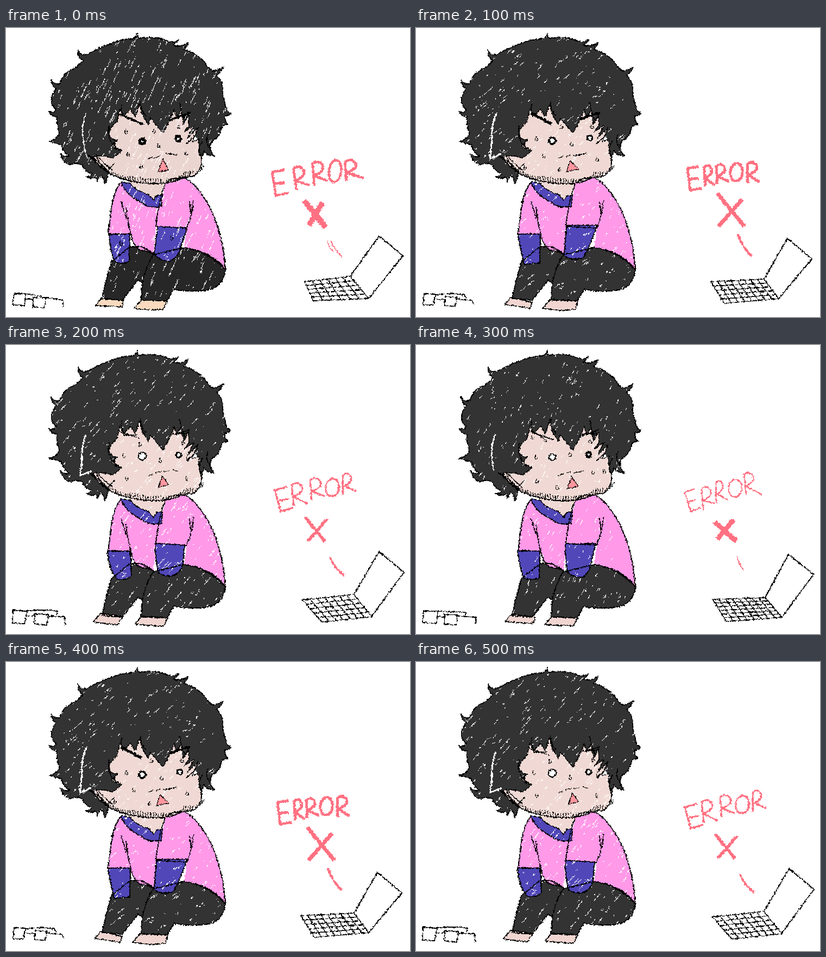
An HTML page for the animation above (0.6 s loop, 744 by 533 pixels).

```html
<!DOCTYPE html>
<html lang="en">
<meta charset="utf-8">
<title>Error</title>
<style>
html, body { margin: 0; width: 100%; height: 100%; overflow: hidden; background: #fff }
svg { display: block; width: 744px; height: 533px }
</style>
<body>
<script>
const hairTop = 'M142,60Q131,54 133,41Q137,51 148,49Q168,38 190,30Q212,20 233,20Q240,18 242,10Q240,16 246,19Q275,14 298,24Q306,28 318,22Q314,28 308,31Q318,37 335,27Q333,36 327,39Q350,46 365,62Q374,76 380,79Q390,79 400,72Q396,82 388,87Q400,98 399,115Q399,128 404,140Q404,152 414,158Q408,163 403,162Q402,172 409,178Q398,178 397,184Q394,198 385,205Q374,212 376,222Q378,232 384,236Q370,236 364,226Q365,235 358,236';
const hairLow = 'L350,200L200,250Q186,262 188,266Q188,276 182,287Q180,274 174,272Q170,278 168,283Q168,276 164,276Q156,279 147,274Q156,274 158,268Q146,266 140,252Q130,248 118,252Q106,250 100,232Q112,240 116,236Q104,228 102,215Q94,214 80,209Q98,204 98,192Q92,176 94,164Q84,164 79,154Q90,158 92,150Q82,142 84,128Q88,118 92,112Q84,106 83,96Q90,106 99,102Q104,86 118,78Q130,74 142,60Z';
const jaw = 'M358,232Q363,246 358,256Q352,274 340,274Q322,276 312,282Q290,289 262,287Q225,284 198,272Q172,260 160,237';
const fringe = 'M160,237Q180,234 196,240L214,226Q202,226 195,216L206,206Q192,208 190,194Q192,182 204,174L210,150L217,162L230,150L238,164L246,140L250,158L262,178L266,166L289,194L300,174L310,150L314,166L322,152L327,178L336,160L337,180L328,192L346,180L334,204L354,183L343,210L356,205Q352,212 358,232';
const strands = 'M248,136Q247,152 258,162M213,140Q211,156 216,164M320,138Q323,158 330,170M190,180Q184,205 204,222M206,206Q190,218 214,226M150,236Q166,240 186,262M170,238Q180,250 196,262M352,184Q352,200 332,213M166,234Q172,256 190,266M358,236Q352,225 362,208M376,222Q366,212 372,196';
const body = 'M212,284Q198,300 193,340L188,380L229,380Q233,400 245,409L272,415L276,366L333,369L328,405Q370,410 404,446Q400,380 375,330Q352,288 330,277Q305,274 294,286L288,310Z';
const neck = 'M226,283L240,300L262,310L272,318L288,306L294,284Z';
const collar = 'M212,284Q218,306 250,322Q264,334 286,329L288,308L277,309L272,318L262,307Q238,300 228,286Z';
const legs = 'M195,430Q186,455 177,499L214,502L243,465L251,470L249,502L297,503L309,482Q350,490 383,480Q402,468 404,446Q380,412 328,405L272,418L250,403L229,403Z';
const folds = 'M212,320L222,352M221,330Q224,360 230,380Q233,400 245,409L272,415M294,286Q282,312 276,366L333,369M345,318Q344,342 333,369M338,320L341,345M188,380H229M229,403Q254,400 272,417Q254,445 250,480';

const poses = [
  { hair: '#303030', legs: '#272727', skin: '#ebd5d0', feet: '#f9dabf',
    scratch: [620, .42, -.9, 26],
    cuffs: 'M190,381Q192,412 200,430Q214,438 227,430L228,380ZM279,366Q276,395 273,415Q280,430 302,430Q316,424 320,410L333,369Z',
    toes: 'M176,498L165,512L214,514L216,503ZM249,502L236,517Q265,521 289,519L297,503Z',
    eyes: [[251, 209, 5, 5], [317, 204, 4.5, 5]],
    brows: 'M205,157L253,178M340,156L300,171', browWidth: 4,
    nose: 'M261,241L270,238M270,241L283,236M294,231L315,234',
    mouth: 'M289,241L299,262L280,265Z',
    drops: [[221, 192], [273, 191], [319, 183], [281, 218], [225, 234], [249, 256], [332, 232], [212, 398], [305, 388]],
    shine: 'M148,157Q138,180 142,205T149,240', shineWidth: 2,
    screen: [[634, 458], [687, 384], [731, 420], [668, 499]], keys: [[550, 468], [634, 458], [668, 499], [566, 503]], grid: [6, 5],
    glasses: 'M36,490L15,490L12,511L34,512ZM36,490L104,502L106,514M36,500H50M50,497L73,498L71,516L50,515Z',
    ink: 4.5, e: [490, 266, 497, 309, 23, -5],
    rs: [[529, 258, 535, 299, 20, 559, 290], [564, 249, 568, 290, 20, 592, 282], [624, 246, 627, 282, 21, 659, 277]],
    o: [606, 264, 11, 18], cross: 'M549,318L589,368M583,322L558,364', crossWidth: 10,
    tick: 'M592,393Q594,404 603,413M598,392Q606,410 619,422', tickWidth: 1.5 },
  { scratch: [520, .75, -.66, 13],
    cuffs: 'M187,380L199,436L228,433L229,380ZM278,364Q274,395 273,420Q284,430 308,424Q322,400 333,364Z',
    toes: 'M174,497L164,510L210,517L214,506ZM247,501L233,517L265,521L294,519L298,503Z',
    eyes: [[251, 208, 6, 4], [320, 203, 5, 3]],
    brows: 'M212,157L249,177M338,156L302,168', browWidth: 5,
    nose: 'M262,240L271,237M274,238L284,235M290,236L314,231',
    mouth: 'M284,244L300,260L277,265Z',
    drops: [[222, 205], [268, 183], [324, 182], [287, 215], [236, 237], [201, 258], [265, 262], [334, 243]],
    shine: 'M149,156Q138,178 140,205L136,242L157,232', shineWidth: 3,
    screen: [[641, 463], [684, 388], [729, 426], [668, 499]], keys: [[543, 468], [641, 463], [668, 499], [568, 508]], grid: [8, 5],
    glasses: 'M15,490L36,491L32,511L13,511ZM36,492Q70,488 91,493L92,499M37,501L52,500M54,495L76,497L72,513L52,512ZM76,500L103,502L106,510',
    ink: 5, e: [500, 259, 505, 299, 21, -4],
    rs: [[530, 256, 533, 292, 15, 550, 290], [553, 254, 555, 288, 16, 576, 283], [610, 250, 611, 286, 18, 632, 284]],
    o: [590, 266, 11, 15], cross: 'M555,305L605,366M601,316L557,366', crossWidth: 7,
    tick: 'M593,380Q599,402 619,422', tickWidth: 4 },
  { scratch: [500, .65, -.76, 17],
    cuffs: 'M187,380Q190,415 204,431Q216,436 231,427L229,380ZM275,366Q275,400 281,420Q292,428 306,426Q324,420 326,400L329,369Z',
    toes: 'M174,495L160,511L205,516L215,501ZM249,500L238,515L290,519L298,503Z',
    eyes: [[251, 205, 7, 2.2], [318, 203, 4.5, 3]],
    brows: 'M207,159L246,172M215,166L240,166M338,157L300,167M336,163L306,164', browWidth: 1.8,
    nose: 'M261,241L271,238M275,236L286,233M290,234L300,232M307,230L316,233',
    mouth: 'M288,241L299,258L281,262Z',
    drops: [[247, 184], [217, 206], [326, 181], [334, 211], [284, 214], [222, 247], [333, 247]],
    shine: 'M147,165Q138,190 140,215L136,241L158,233', shineWidth: 3,
    screen: [[641, 460], [687, 381], [733, 419], [673, 501]], keys: [[546, 470], [641, 460], [673, 501], [582, 511]], grid: [7, 5],
    glasses: 'M13,489L39,491L34,514L12,513ZM39,490Q80,487 95,491L93,499M38,500L52,499M53,496L78,497L75,517L52,514ZM78,500L108,501L109,516',
    ink: 3.2, e: [495, 268, 506, 307, 23, -7],
    rs: [[526, 257, 530, 296, 20, 556, 293], [560, 248, 563, 286, 20, 587, 279], [621, 239, 620, 276, 15, 645, 270]],
    o: [601, 263, 12, 15], cross: 'M551,318L588,363M591,321L556,362', crossWidth: 5.5,
    tick: 'M597,392Q604,411 623,425', tickWidth: 3.5 },
  { scratch: [500, .5, -.86, 11],
    cuffs: 'M187,379Q191,410 198,430Q214,434 227,430L228,380ZM275,367Q275,400 279,418Q290,430 307,428Q320,420 323,400L331,366Z',
    toes: 'M176,496L164,510L215,514L220,502ZM249,502L237,516L290,518L298,503Z',
    eyes: [[251, 207, 6, 2], [318, 202, 4.5, 4]],
    brows: 'M211,160L254,175M214,158L234,172M337,156L302,169M334,163L304,165', browWidth: 2.2,
    nose: 'M262,241L272,238M275,236L284,234M290,236L308,232',
    mouth: 'M287,243L299,261L278,265Z',
    drops: [[215, 172], [238, 176], [321, 179], [221, 208], [284, 203], [223, 252], [260, 264], [326, 236], [347, 234]],
    shine: 'M146,165Q135,190 143,232', shineWidth: 2.5,
    screen: [[643, 466], [686, 386], [732, 423], [674, 502]], keys: [[546, 469], [643, 466], [674, 502], [572, 510]], grid: [8, 6],
    glasses: 'M14,491L40,491L38,513L12,512ZM14,490L91,493V500M39,501L52,502M53,497L76,498L74,516L52,515ZM76,500L110,502V514',
    ink: 2.6, e: [495, 272, 506, 307, 18, -7],
    rs: [[526, 264, 529, 304, 17, 550, 292], [552, 253, 553, 292, 13, 575, 286], [604, 238, 608, 276, 18, 637, 276]],
    o: [588, 264, 12, 15], cross: 'M550,326L590,362M585,322L555,358', crossWidth: 9,
    tick: 'M591,389Q594,404 604,416', tickWidth: 2 }
];

const RED = '#ff7182';
const fill = (d, color) => `<path d="${d}" fill="${color}"/>`;
const line = (d, width = 2, color = '#000', inside = 'none') =>
  `<path d="${d}" fill="${inside}" stroke="${color}" stroke-width="${width}"/>`;
const poly = pts => 'M' + pts.join('L') + 'Z';
const mix = (a, b, k) => [a[0] + (b[0] - a[0]) * k, a[1] + (b[1] - a[1]) * k];

function randomizer(seed) {
  return () => (seed = seed * 16807 % 2147483647) / 2147483647;
}

function scratches([count, dx, dy, length], seed) {
  const rnd = randomizer(seed);
  let d = '';
  for (let i = 0; i < count; i++) {
    const len = 2 + length * rnd() ** 2;
    d += `M${82 + rnd() * 325},${18 + rnd() * 480}l${dx * len},${dy * len}`;
  }
  return line(d, 1, '#fff');
}

function stubble() {
  const path = document.createElementNS('http://www.w3.org/2000/svg', 'path');
  path.setAttribute('d', jaw);
  let d = '';
  for (let s = 26; s < path.getTotalLength(); s += 4.6) {
    const p = path.getPointAtLength(s), q = path.getPointAtLength(s + 1);
    const h = 7 + s * 7 % 4;
    d += `M${p.x},${p.y}l${(p.y - q.y) * -h},${(q.x - p.x) * h}`;
  }
  return line(d, 1.2);
}

function keyboard([a, b, c, d], [cols, rows]) {
  let p = poly([a, b, c, d]);
  for (let i = 1; i < cols; i++) p += `M${mix(a, b, i / cols)}L${mix(d, c, i / cols)}`;
  for (let i = 1; i < rows; i++) p += `M${mix(a, d, i / rows)}L${mix(b, c, i / rows)}`;
  return p;
}

function lettering({ e: [x, y, x2, y2, w, rise], rs, o: [cx, cy, rx, ry] }) {
  const mx = (x + x2) / 2, my = (y + y2) / 2;
  let d = `M${x + w},${y + rise}L${x},${y}L${x2},${y2}l${w},${rise}M${mx},${my}l${w - 3},${rise / 2}`;
  for (const [a, b, a2, b2, bowl, lx, ly] of rs) {
    const mid = b + (b2 - b) * .52;
    d += `M${a},${b}L${a2},${b2}M${a},${b + 2}C${a + bowl * .5},${b - 10} ${a + bowl * 1.4},${b + 6} ${a + bowl * .8},${mid - 5}Q${a + bowl * .5},${mid} ${a + 3},${mid + 2}L${lx},${ly}`;
  }
  return d + `M${cx - rx},${cy}a${rx},${ry} 8 1 1 ${rx * 2},0a${rx},${ry} 8 1 1 ${-rx * 2},0`;
}

function draw(p, i) {
  const { hair = '#333', legs: cloth = '#333', skin = '#f0d9d4', feet = '#f0d5d0' } = p;
  const face = fringe + jaw.replace('M358,232', '') + 'Z';
  const drops = p.drops.map(([x, y]) => `M${x - 1},${y - 5}Q${x - 4},${y + 3} ${x},${y + 3}Q${x + 4},${y + 2} ${x + 1},${y - 2}`).join('');
  const eyes = p.eyes.map(([x, y, r, w]) => `<circle cx="${x}" cy="${y}" r="${r}" fill="#fff" stroke="#000" stroke-width="${w}"/>`).join('');
  return `<filter id="rough${i}" filterUnits="userSpaceOnUse" x="0" y="0" width="744" height="533" color-interpolation-filters="sRGB">
    <feTurbulence type="fractalNoise" baseFrequency=".3" numOctaves="2" seed="${i + 3}"/>
    <feDisplacementMap in="SourceGraphic" scale="5" xChannelSelector="R" yChannelSelector="G"/></filter>
  <g class="pose" filter="url(#rough${i})" visibility="hidden">` +
    fill(legs, cloth) + fill(p.toes, feet) + fill(body, '#ff99e8') + fill(neck, skin) +
    fill(collar, '#5147b8') + fill(p.cuffs, '#5147b8') +
    fill(hairTop + hairLow, hair) + fill(face, skin) + scratches(p.scratch, 91 + i * 7717) +
    line(legs) + line(p.toes, 1.8) + line(body.replace('L188,380L229,380Q233,400 245,409L272,415L276,366L333,369L328,405', 'L188,380M328,405').replace('L288,310Z', '')) +
    line(collar, 1.8) + line(folds, 1.8) + line(p.cuffs) +
    line(hairTop, 1.8) + line(hairLow.replace('L350,200L200,250', 'M200,250').replace('Z', ''), 1.8) +
    line(strands, 1.8) + line(fringe, 1.4) + line(jaw) + stubble() +
    line(p.shine, p.shineWidth, '#fff') + line(p.brows, p.browWidth) + line(p.nose, 1.4) +
    line(p.mouth, 1.4, '#000', '#ff969f') + line(drops, 1.3) + eyes +
    line(poly(p.screen)) + line(keyboard(p.keys, p.grid), 1.6) + line(p.glasses, 1.7) +
    line(lettering(p), p.ink, RED) + line(p.cross, p.crossWidth, RED) + line(p.tick, p.tickWidth, RED) + '</g>';
}

document.body.innerHTML = `<svg viewBox="0 0 744 533" shape-rendering="crispEdges" stroke-linejoin="round">${poses.map(draw).join('')}</svg>`;
const groups = document.querySelectorAll('.pose');
const order = [0, 1, 2, 3, 1, 2];

function show() {
  const now = order[Math.floor(performance.now() / 100) % 6];
  groups.forEach((g, i) => g.setAttribute('visibility', i === now ? 'visible' : 'hidden'));
  requestAnimationFrame(show);
}
show();
</script>
</body>
</html>
```
